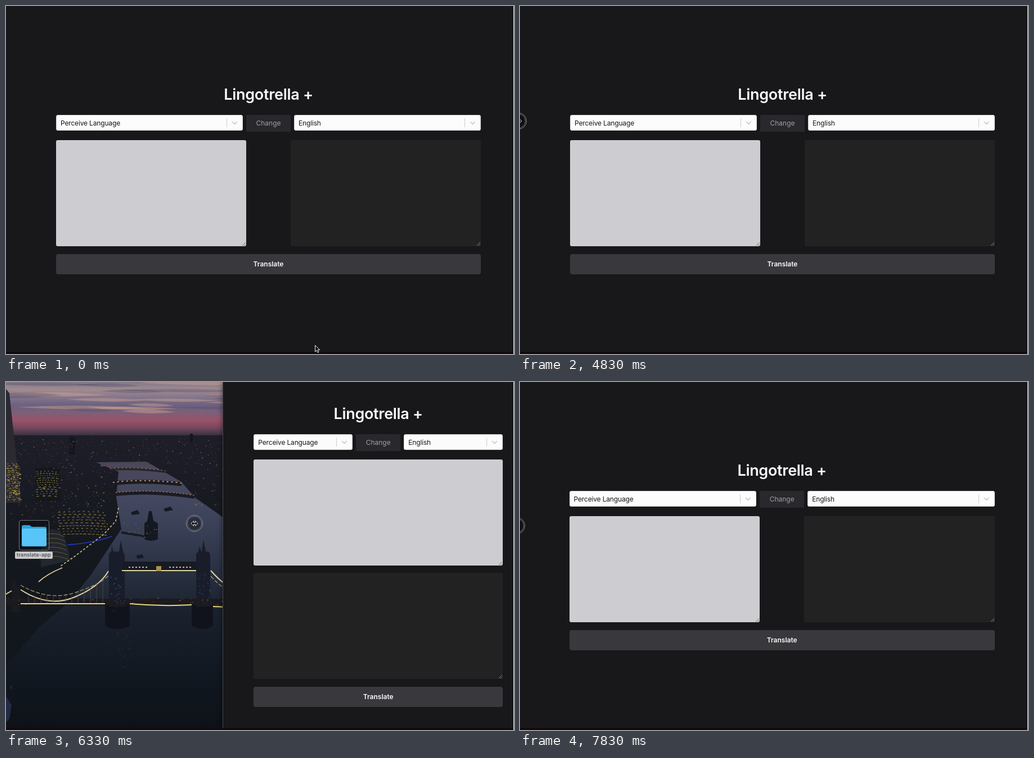
Recreate the animation shown at these times as an HTML page with a canvas. Size 903 px wide and 620 px high, loop 8000 ms.

```html
<!DOCTYPE html>
<html lang="en">
<head>
<meta charset="utf-8">
<title>Translator window</title>
<style>
  html, body { margin: 0; width: 100%; height: 100%; overflow: hidden; background: #18181a; }
  #stage { position: relative; width: 903px; height: 620px; overflow: hidden; background: #18181a;
    font: 12px/1 Inter, "Liberation Sans", sans-serif; }
  #photo { position: absolute; left: 0; top: 0; }
  #floor { position: absolute; left: 0; right: 0; top: 616px; height: 4px; background: #120a10; }
  #edge { position: absolute; right: 0; top: 0; width: 1px; height: 620px; background: #f4f4f4; }

  .frame { position: absolute; left: 23px; top: 246px; width: 52px; height: 52px;
    border: 1px solid #777a80; border-radius: 4px; background: rgba(0, 0, 0, .28); }
  .folder { position: absolute; left: 27px; top: 254px; }
  .label { position: absolute; left: 16px; top: 302px; width: 67px; height: 12.5px; border-radius: 2px;
    background: #c9c9cb; color: #55565a; font-size: 9px; font-weight: 600; line-height: 12.5px;
    text-align: center; white-space: nowrap; letter-spacing: .15px; }

  .win { position: absolute; top: 0; height: 616px; left: -5.4px; right: -35.4px; background: #18181a;
    display: flex; align-items: center; container-type: inline-size;
    box-shadow: inset 1px 0 #48484b, 0 0 9px rgba(0, 0, 0, .55);
    animation: drag 8s step-end infinite; }
  main { width: 80%; margin: 0 auto; }
  h1 { margin: 0 0 16px; height: 40px; color: #fafafa; font-size: 27px; font-weight: 600;
    line-height: 40px; letter-spacing: -.3px; text-align: center; white-space: nowrap; }
  .row { display: flex; gap: 6px; height: 30px; margin-bottom: 15px; }
  .select { position: relative; flex: 1; height: 28px; box-sizing: border-box; padding-left: 7px;
    border: 1px solid #d6d6d6; border-radius: 3px; background: #fcfcfc; color: #161616;
    line-height: 27px; letter-spacing: -.16px; white-space: nowrap; }
  .select::after { content: ""; position: absolute; right: 27px; top: 5px; bottom: 5px; width: 1px; background: #ccc; }
  .select svg { position: absolute; right: 8px; top: 10px; }
  .change { width: 79px; background: #29282d; color: #a0a0a5; line-height: 30px; text-align: center; }
  .boxes { display: flex; justify-content: space-between; gap: 79px; margin-bottom: 14px; }
  .box { position: relative; flex: 1; height: 189px; border-radius: 3px; background: #cdccd0; }
  .box + .box { background: #222223; }
  .box svg { position: absolute; right: 0; bottom: 0; }
  .go { height: 36px; border-radius: 4px; background: #39383d; color: #fafafa;
    font-weight: 600; line-height: 36px; text-align: center; }
  @container (max-width: 576px) {
    .boxes { flex-direction: column; gap: 13.5px; }
    .box { flex: none; }
  }

  .cursor { position: absolute; left: 0; top: 0; overflow: visible; }
  .arrow { animation: point 8s step-end infinite; }
  .grip { animation: grip 8s step-end infinite; }
  .pulse { animation: pulse 8s step-end infinite; }

  @keyframes drag {
    0% { left: -5.4px }
    62.48% { left: 5px }
    64.6% { left: 55px }
    66.6% { left: 132px }
    68.73% { left: 227px }
    70.85% { left: 324px }
    72.85% { left: 414px }
    74.98% { left: 483px }
    79.1% { left: 385px }
    81.23% { left: 285px }
    83.35% { left: 168px }
    85.35% { left: 62px }
    87.48% { left: -1px }
    93.73% { left: -3px }
    95.85% { left: -5px }
    97.85%, 100% { left: -7px }
  }
  @keyframes point {
    0% { transform: translate(549px, 604px); opacity: 1 }
    2.1% { transform: translate(330px, 380px) }
    4.1% { transform: translate(189px, 234px) }
    29.1% { transform: translate(72px, 141px) }
    31.23% { transform: translate(20px, 150px) }
    33.35% { transform: translate(1px, 154px) }
    37.48% { transform: translate(0, 196px); opacity: 1 }
    49.98%, 100% { transform: translate(0, 196px); opacity: 0 }
  }
  @keyframes pulse {
    0% { transform: translate(3px, 198px); opacity: 0 }
    41.6% { transform: translate(3px, 198px); opacity: 1 }
    43.73% { transform: translate(3px, 198px) scale(1.18); opacity: .5 }
    45.85%, 100% { transform: translate(3px, 198px); opacity: 0 }
  }
  @keyframes grip {
    0% { transform: translate(-40px, 205px) }
    60.35% { transform: translate(-3px, 205px) }
    62.48% { transform: translate(22px, 213px) }
    64.6% { transform: translate(82px, 223px) }
    66.6% { transform: translate(158px, 232px) }
    68.73% { transform: translate(243px, 237.5px) }
    70.85% { transform: translate(345px, 244px) }
    72.85% { transform: translate(437.5px, 249px) }
    74.98% { transform: translate(486px, 251px) }
    79.1% { transform: translate(335px, 252px) }
    81.23% { transform: translate(228px, 252px) }
    83.35% { transform: translate(112px, 253px) }
    85.35% { transform: translate(28px, 254px) }
    87.48% { transform: translate(0, 255px) }
    93.73% { transform: translate(-2px, 255px) }
    95.85% { transform: translate(-4px, 256px) }
    97.85%, 100% { transform: translate(-6px, 256px) }
  }
</style>
</head>
<body>
<div id="stage">
  <canvas id="photo" width="500" height="616"></canvas>
  <div class="frame"></div>
  <svg class="folder" width="46" height="40">
    <path d="M1 4q0-3 3-3h10q2 0 3 1.500t3 1.500h22q3 0 3 3v10h-44z" fill="#2aa3dc"/>
    <rect x="1" y="7" width="44" height="32" rx="3" fill="#58c4f7"/>
    <path d="M1 35.500q0 3 3 3h38q3 0 3-3" fill="none" stroke="#3aa9df"/>
  </svg>
  <div class="label">translate-app</div>

  <div class="win">
    <main>
      <h1>Lingotrella +</h1>
      <div class="row">
        <div class="select">Perceive Language<svg width="11" height="8"><use href="#down"/></svg></div>
        <div class="change">Change</div>
        <div class="select">English<svg width="11" height="8"><use href="#down"/></svg></div>
      </div>
      <div class="boxes">
        <div class="box"><svg width="8" height="8"><use href="#resize" stroke="#707074"/></svg></div>
        <div class="box"><svg width="8" height="8"><use href="#resize" stroke="#8c8c8e"/></svg></div>
      </div>
      <div class="go">Translate</div>
    </main>
  </div>
  <div id="floor"></div>
  <div id="edge"></div>

  <svg class="cursor" width="1" height="1">
    <defs>
      <path id="down" d="M1.500 1.500l4 4 4-4" fill="none" stroke="#c4c4c4" stroke-width="1.500" stroke-linecap="round"/>
      <path id="resize" d="M1 7l6-6M4.500 7l2.500-2.500" fill="none"/>
      <g id="ring" fill="none" stroke="#a9a9ac" stroke-opacity=".8">
        <circle r="14.500" fill="#000" fill-opacity=".3"/>
        <circle r="12.500" stroke="#85858a"/>
      </g>
    </defs>
    <g class="pulse"><use href="#ring"/></g>
    <path class="arrow" d="M.5.500v11.500l2.700-2.500 1.800 4 2-.9-1.800-3.900h3.600z" fill="#111" stroke="#f2f2f2"/>
    <g class="grip">
      <use href="#ring"/>
      <path d="M-6 0l4.500-4.300v2.800h3v-2.800l4.500 4.300-4.500 4.300v-2.800h-3v2.800z" fill="#0c0c0d" stroke="#f0f0f0" stroke-width=".9"/>
    </g>
  </svg>
</div>

<script>
  const g = document.getElementById('photo').getContext('2d');
  let seed = 11;
  const rnd = () => (seed = seed * 16807 % 2147483647) / 2147483647;

  function fade(y, h, ...stops) {
    const grad = g.createLinearGradient(0, y, 0, y + h);
    stops.forEach((c, i) => grad.addColorStop(i / (stops.length - 1), c));
    return grad;
  }
  function shape(path, fill) {
    g.fillStyle = fill;
    g.fill(new Path2D(path));
  }
  function line(path, color, width = 1.5, dash = []) {
    g.strokeStyle = color;
    g.lineWidth = width;
    g.setLineDash(dash);
    g.stroke(new Path2D(path));
  }
  function lights(n, x, y, w, h, colors, size = 1.6) {
    for (let i = 0; i < n; i++) {
      g.fillStyle = colors[Math.floor(rnd() * colors.length)];
      g.globalAlpha = .25 + rnd() * .6;
      g.fillRect(x + rnd() * w, y + rnd() * h, .8 + rnd() * size, .8 + rnd() * size * .6);
    }
    g.globalAlpha = 1;
  }
  // lit office floors
  function floors(x, y, w, h, gap) {
    for (let i = 0; i < h; i += gap)
      line(`M${x + rnd() * 6} ${y + i}q${w / 2} -3 ${w - 6} 1`, 'rgba(190,170,66,.6)', 1.3, [1 + rnd() * 4, 2 + rnd() * 4]);
  }
  const warm = ['#c08a42', '#d6b45c', '#8f5f36', '#6f5a48', '#5a5258'];
  const gold = ['#d8c84a', '#b8a63a', '#8c8434'];
  const blue = ['#4a5ad8', '#5a6ab4', '#2c3cae'];

  // dusk sky
  shape('M0 0H500V96H0z', fade(0, 96, '#83778a', '#a08b90', '#84758a', '#6b6280', '#7d5f78', '#9a5268', '#74465e', '#33303f'));
  for (let i = 0; i < 26; i++) {
    const x = rnd() * 480 - 60, y = rnd() * 56, w = 80 + rnd() * 160;
    shape(`M${x} ${y}q${w / 2} ${-3 - rnd() * 4} ${w} 2q${-w / 2} 5 ${-w} -2`,
      i % 2 ? 'rgba(214,170,146,.42)' : 'rgba(82,76,104,.36)');
  }

  // city, river and its banks
  shape('M0 95H500V616H0z', fade(95, 521, '#1e1e29', '#15181f', '#12161d', '#12161d'));
  shape('M160 143L250 142 312 178 336 206 376 234 420 268 500 310V616H0V505L60 436 110 394 150 345 205 262 196 205 200 160z',
    fade(142, 474, '#4a4658', '#434860', '#363d52', '#272e3e', '#1a212d', '#141b25', '#10161e', '#0d1218'));
  shape('M0 560L10 575 6 600 0 606z', '#222a44');
  shape('M112 98h11v32h-11zM52 152h45v60h-45zM327 92h5v16h-5z', '#14171d');

  lights(300, 0, 100, 500, 45, warm, 1);
  lights(190, 0, 145, 190, 110, warm, 1.2);
  lights(120, 315, 140, 185, 85, warm, 1.2);
  floors(52, 160, 45, 46, 4);
  floors(90, 232, 92, 44, 5);
  lights(50, 60, 160, 120, 112, gold, 1.8);

  // left tower and dome
  shape('M0 12L6 20 27 215H0z', '#2b2a30');
  floors(0, 146, 26, 66, 4);
  lights(80, 0, 145, 24, 65, gold, 3.5);
  shape('M62 330Q60 264 84 262Q108 266 114 318z', '#22262d');
  for (let y = 272; y < 318; y += 8) line(`M70 ${y}Q90 ${y - 5} ${104 + (y - 272) / 6} ${y + 4}`, '#625936', 1);

  // far bridges
  line('M168 149Q220 146 262 153', '#51485a', 3);
  line('M190 181Q240 174 312 182', '#1c1b23', 7);
  line('M190 179Q240 172 312 180', '#c89a60', 1.8, [3, 5]);
  line('M195 200Q260 193 335 205', '#1c1b23', 6);
  line('M195 197Q260 190 335 202', '#b58452', 1.4, [2, 4]);
  line('M185 156Q230 153 284 160', '#26242e', 4);
  line('M185 154Q230 151 284 158', '#a88058', 1.3, [2, 5]);

  // boats
  shape('M246 280V252l5-4 3-18h5l3 17 8 5v28q-12 6-24 0z', '#141822');
  shape('M222 232l12-4 4 7-14 2zM280 226l12-4 5 6-14 3zM232 309l10-2 3 6-12 2zM394 262l12 8 8 40-10 4z', '#161a24');
  line('M205 268l42 7', '#171b24', 4);
  lights(22, 208, 250, 62, 26, warm);

  // embankment
  line('M200 224l-5 24-22 24-50 38-26 18', '#cdbd80', 1.6, [4, 3]);
  line('M110 290q45-3 78-15', '#2038b8', 1.8);
  line('M58 356q15-14 42-25', '#d8cd92', 1.8);

  // main bridge
  shape('M176 398h44v36q-22 12-44 0zM330 398h38v36q-19 12-38 0z', '#10131b');
  shape('M183 400V306l4-4 1-10 3 10h10l3-20 4 20 3 6v92zM338 400V306l4-4 2-10 3 10h1l3-21 4 21h5l3 6v92z', '#191d2a');
  shape('M208 320H340V336H208z', '#171a24');
  line('M218 330h36M290 330h40', '#bfb99a', 1.8, [3, 3]);
  line('M206 336H338', '#ded69c', 2);
  shape('M267 328h9v9h-9z', '#a8924e');
  shape('M0 386H500V398H0z', '#1a1a1f');
  line('M26 395H176M220 395Q275 400 330 397M368 400L500 405', '#ead878', 2);
  line('M26 370Q75 402 120 384T182 337M364 336Q390 366 420 378T500 384', '#e0d6a4', 2);
  line('M26 362Q75 390 120 376T182 345M364 346Q390 374 420 386', '#a89e70', 1.3, [7, 3]);
  for (let x = 40; x < 178; x += 11) line(`M${x} ${380 - Math.max(0, x - 120) * .55}V394`, '#575040', .8);
  shape('M10 410V362l4-12 5 12 6 6v42z', '#1a1a1f');
  line('M0 378l10-6', '#e2c870', 2);
  lights(26, 186, 340, 22, 68, blue);
  lights(26, 341, 340, 22, 68, blue);
  lights(40, 0, 384, 412, 12, ['#b26a3a', '#cfa860'], 1.4);
  lights(30, 195, 440, 25, 70, ['#3e382c', '#343230'], 1.6);
  lights(3, 7, 540, 2, 8, ['#e0532c'], 2);
</script>
</body>
</html>
```
